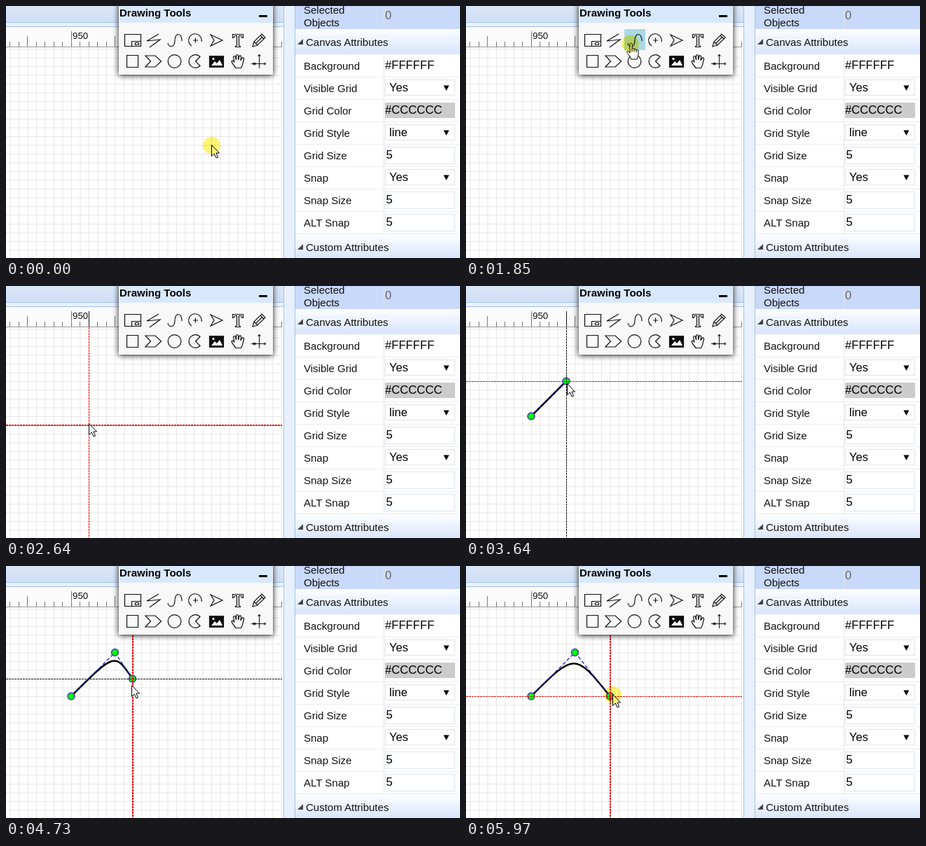
Animation, 648 px wide and 360 px high, one loop 8 s. Source, as an HTML page:

```html
<!DOCTYPE html>
<html lang="en">
<head>
<meta charset="utf-8">
<title>Curve tool</title>
<style>
  html, body { margin: 0; width: 100%; height: 100%; overflow: hidden; background: #fff; }
  svg { display: block; width: 648px; height: 360px; }
  text { font: 15px "Liberation Sans", Arial, sans-serif; fill: #111; }
  .value { font-size: 16.67px; fill: #000; }
  .title { font-weight: bold; fill: #000; }
  .crisp { shape-rendering: crispEdges; }
  .icons { fill: none; stroke: #111; stroke-width: 1.2; }
  .palette { filter: drop-shadow(0 1px 4px rgba(0, 0, 0, .9)); }
  .cross { stroke-dasharray: 3 1; shape-rendering: crispEdges; }
  .dot { fill: #0f0; stroke: #4b35c4; stroke-width: 1.5; }
  #halo { fill: #fff474; mix-blend-mode: multiply; }
</style>
</head>
<body>
<svg viewBox="0 0 648 360">
  <defs>
    <linearGradient id="bar" x2="0" y2="1">
      <stop stop-color="#dbe7f8"/><stop offset="1" stop-color="#cfdff6"/>
    </linearGradient>
    <linearGradient id="head" x2="0" y2="1">
      <stop stop-color="#fbfdff"/><stop offset="1" stop-color="#d8e4fc"/>
    </linearGradient>
    <clipPath id="stage"><path d="M0 36H394V360H0Z"/></clipPath>
  </defs>
  <rect width="648" height="360" fill="#fff"/>

  <!-- toolbar and ruler -->
  <g class="crisp">
    <path fill="url(#bar)" d="M0 0H396V23H0Z"/>
    <path fill="#a3c0e8" d="M0 23H396V24H0Z"/>
    <path fill="#eaf2fc" d="M0 24H396V29H0Z"/>
    <path fill="#a3c0e8" d="M0 29H396V30H0Z"/>
    <path fill="#fbfbfb" d="M0 30H394V58H0Z"/>
    <path id="ticks" fill="none" stroke="#777"/>
    <path fill="#999" d="M0 58H394V59H0Z"/>
  </g>
  <path id="grid" fill="none" stroke="#e6e6e6"/>
  <text x="95" y="47" style="font-size:13.3px">950</text>

  <!-- drawing -->
  <g clip-path="url(#stage)">
    <path id="curve" fill="none" stroke="#000" stroke-width="2.5"/>
    <path id="guide" fill="none" stroke="#2222b4" stroke-width="1.3" stroke-dasharray="5 3"/>
    <g id="dots"></g>
    <g id="cross">
      <path id="mark" class="crisp" stroke="#111"/>
      <path id="crossX" class="cross"/>
      <path id="crossY" class="cross"/>
    </g>
  </g>

  <!-- tool palette -->
  <path class="palette" fill="#f8f8f8" d="M161 -5V98H381V-5Z"/>
  <path fill="#d9e9fd" d="M162 0H380V24H162Z"/>
  <text class="title" x="162" y="15">Drawing Tools</text>
  <path d="M361 13h12v3h-12z"/>
  <rect id="hover" class="crisp" width="30" height="30" fill="#add8e6"/>
  <g class="icons">
    <path d="M169.5 40.5h23v17h-23zM179.5 57.5v-7h13M184.5 52.5h5v3h-5z"/>
    <path d="M218 40L201 50L220 48L205 59"/>
    <path d="M231 53C232 60 241 60 241 49C241 38 251 37 251 50"/>
    <path d="M265 57A9.3 9.3 0 1 1 279 51M267 49h7M270.5 45.5v7"/>
    <path d="M292 41L309 49L292 57L297 49Z"/>
    <path d="M323.5 40.5h15v5h-1.5l-1.5-3h-3v14l2 1v1h-7v-1l2-1v-14h-3l-1.5 3h-1.5z"/>
    <path d="M352 58L354 51L365 40L370 45L359 56ZM354 51L359 56M363 42L368 47M356.5 53.5L366 44"/>
    <path d="M172.5 70.5h16v17h-16z"/>
    <path d="M199 71h14l8.5 8l-8.5 8h-14l7.5 -8z"/>
    <circle cx="240.5" cy="79" r="9.3"/>
    <path d="M270.5 79L277 72.5A9.3 9.3 0 1 0 277 85.5Z"/>
    <path fill="#0a0a0a" d="M290.5 71.5h20v16h-20z"/>
    <path fill="#fff" stroke="none" d="M293 85l5-6l3 3l4-5l4 8z"/>
    <circle cx="296" cy="75.5" r="1.7" fill="#fff" stroke="none"/>
    <path d="M328 88.5C325 85 323 82 322 79.5C322 77.5 324 77.5 326 80.5L324.5 73C325 71 327 71 327.5 73L328.5 77V71C329 69 331 69 331.5 71V77L333 71.5C334 70 336 71 335.5 73L335 78L337 74.500C338 73 340 74 339.5 76C338 81 338.5 84 335.500 88.5Z"/>
    <path stroke-width="1" d="M361.500 89V69M359.500 72l2-3l2 3M350 82.500h21M368.500 80.500l2.500 2l-2.500 2"/>
    <circle cx="354.500" cy="82.500" r="1.500"/>
  </g>

  <!-- attributes -->
  <g class="crisp">
    <path fill="#e7f0fc" d="M396 0H413V360H396Z"/>
    <path fill="#a5c2e8" d="M396 0h1V360h-1zM412 0h1V360h-1z"/>
    <path fill="#c9d9fa" d="M413 0H648V33H413Z"/>
  </g>
  <text x="425" y="11">Selected</text>
  <text x="425" y="29">Objects</text>
  <text class="value" x="541" y="19" style="fill:#666">0</text>
  <g id="rows"></g>

  <!-- pointer -->
  <g id="pointer" fill="#fff" stroke="#000" stroke-linejoin="round">
    <path id="arrow" d="M.5 .5V16.5L4.300 13L7 19L9.500 18L6.900 12H11.500Z"/>
    <path id="hand" d="M0 14V1.500C0 -.5 3 -.5 3 1.500V8C3.500 6.500 6 7 6 9C6.500 7.500 9 8 9 10C10 8.500 12 9.500 12 11V16C12 18 10.500 20 10 23H1.500C1.500 20 -2.500 16 -4 13.500C-4.500 11 -2 10.500 0 14ZM3 8V12M6 9V12M9 10V13"/>
  </g>
  <circle id="halo" r="12.300"/>
</svg>
<script>
const $ = id => document.getElementById(id);
const set = (el, attrs) => { for (const k in attrs) el.setAttribute(k, attrs[k]); };
const show = (el, on) => el.setAttribute('visibility', on ? 'visible' : 'hidden');

const LOOP = 8000, CELL = 12.5, OX = 93, OY = 186;

// Ruler and grid
let grid = '', ticks = '';
for (let i = -7; i <= 24; i++) {
  const x = OX + i * CELL;
  const tall = i % 10 === 0 ? 22 : i % 5 === 0 ? 15 : 7;
  grid += `M${x + .5} 59V360`;
  ticks += `M${Math.floor(x) + .5} 58v${-tall}`;
}
for (let i = -10; i <= 13; i++) grid += `M0 ${OY + i * CELL + .5}H394`;
set($('grid'), { d: grid });
set($('ticks'), { d: ticks });

// Attribute table
const header = (y, name) => `
  <rect class="crisp" x="413" y="${y}" width="235" height="35" fill="url(#head)"/>
  <path d="M416 ${y + 21}h8v-8z" fill="#444"/>
  <text x="428" y="${y + 23}">${name}</text>`;

const cells = {
  plain: () => '',
  fill: y => `<path fill="#ccc" d="M541 ${y + 4}h100v22h-100z"/>`,
  input: y => `<path fill="#fff" stroke="#dbe4f2" d="M541.5 ${y + 3.5}h99v24h-99z"/>`,
  list: y => `<path fill="#fff" stroke="#e2e2e2" d="M541.5 ${y + 3.5}h99v22h-99z"/>
    <path d="M624.5 ${y + 11.5}h8l-4 7.500z" shape-rendering="auto"/>`
};
const row = ([name, value, kind], i) => {
  const y = 70 + i * 32;
  const x = { list: 547, input: 542.5 }[kind] || 541;
  return `<path class="crisp" d="M413 ${y + 31.5}H648" stroke="#ececec"/>
    <g class="crisp">${cells[kind](y)}</g>
    <text x="425" y="${y + 21}">${name}</text>
    <text class="value" x="${x}" y="${y + 20}">${value}</text>`;
};
$('rows').innerHTML = header(34, 'Canvas Attributes') + [
  ['Background', '#FFFFFF', 'plain'],
  ['Visible Grid', 'Yes', 'list'],
  ['Grid Color', '#CCCCCC', 'fill'],
  ['Grid Style', 'line', 'list'],
  ['Grid Size', '5', 'input'],
  ['Snap', 'Yes', 'list'],
  ['Snap Size', '5', 'input'],
  ['ALT Snap', '5', 'input']
].map(row).join('') +
  '<path class="crisp" d="M539.5 0V33M539.5 70V326" stroke="#e4e4e4"/>' +
  header(327, 'Custom Attributes');

// Pointer moves: time span, number of steps, path as [step, x, y]
const moves = [
  { from: 780, to: 1390, n: 9, path: [[0, 290, 192], [3, 252, 122], [6, 216, 59], [8, 218, 54]] },
  { from: 1540, to: 1700, n: 3, path: [[0, 224, 54], [2, 234, 53]] },
  { from: 2010, to: 2790, n: 11, path: [[0, 232, 58], [4, 172, 138], [8, 118, 196], [10, 100, 183]] },
  { from: 3490, to: 3800, n: 5, dark: 'x', path: [[0, 112, 170], [2, 144, 139], [4, 155, 127]] },
  { from: 4500, to: 5280, n: 11, dark: 'y', lag: 7, path: [[0, 157, 134], [3, 179, 170], [6, 200, 184], [10, 207, 178]] },
  { from: 5350, to: 5430, n: 2, path: [[0, 208, 181], [1, 208, 182]] },
  { from: 5570, to: 5740, n: 2, path: [[0, 208, 183], [1, 209, 183]] }
];
const clicks = [[0, 780], [1850, 2010], [3010, 3490], [4100, 4500], [5970, LOOP]];

function along(path, k) {
  let i = 1;
  while (i < path.length - 1 && path[i][0] < k) i++;
  const [a, ax, ay] = path[i - 1], [b, bx, by] = path[i];
  const f = (k - a) / (b - a);
  return [Math.round(ax + (bx - ax) * f), Math.round(ay + (by - ay) * f)];
}

function pose(t) {
  const move = moves.filter(m => t >= m.from).pop();
  if (!move) return { x: 293, y: 198, lag: 0 };
  const step = (move.to - move.from) / (move.n - 1);
  const k = Math.min(move.n - 1, Math.floor((t - move.from + 8) / step));
  const [x, y] = along(move.path, k);
  return { x, y, lag: move.lag || 0, dark: k < move.n - 1 && move.dark };
}

const snap = (v, origin) => origin + CELL * Math.round((v - origin) / CELL);
const lineStyle = (v, dark) => ({ stroke: dark ? '#111' : '#e80000', 'stroke-width': v % 1 ? 2 : 1 });

function draw(t) {
  const p = pose(t);
  const col = Math.floor((p.x - 166) / 30), line = Math.floor((p.y - 33) / 30);
  const over = col >= 0 && col < 7 && line >= 0 && line < 2;
  set($('hover'), { x: 166 + col * 30, y: 33 + line * 30 });
  show($('hover'), over);
  show($('hand'), over);
  show($('arrow'), !over);
  set($('pointer'), { transform: `translate(${p.x} ${p.y})` });
  set($('halo'), { cx: p.x + .5, cy: p.y + 1 });
  show($('halo'), clicks.some(([a, b]) => t >= a && t < b));

  const x = snap(p.x - 2, OX), y = snap(p.y - p.lag, OY);
  show($('cross'), t >= 2010 && p.y > 98);
  set($('mark'), { d: `M${Math.floor(x) + .5} 36V58` });
  set($('crossX'), { d: `M${x + .5} 59V360`, ...lineStyle(x, p.dark === 'x') });
  set($('crossY'), { d: `M0 ${y + .5}H394`, ...lineStyle(y, p.dark === 'y') });

  const points = [];
  if (t >= 3490) points.push([OX, OY]);
  if (t >= 4500) points.push([155.5, 123.5]);
  if (t >= 3490) points.push([x, y]);
  const [a, b, c] = points;
  set($('curve'), { d: c ? `M${a}C${b} ${b} ${c}` : b ? `M${a}L${b}` : 'M0 0' });
  set($('guide'), { d: points.length ? 'M' + points.join('L') : 'M0 0' });
  $('dots').innerHTML = points.map(([px, py]) => `<circle class="dot" cx="${px}" cy="${py}" r="5"/>`).join('');
}

function frame() {
  draw(performance.now() % LOOP);
  requestAnimationFrame(frame);
}
frame();
</script>
</body>
</html>
```
